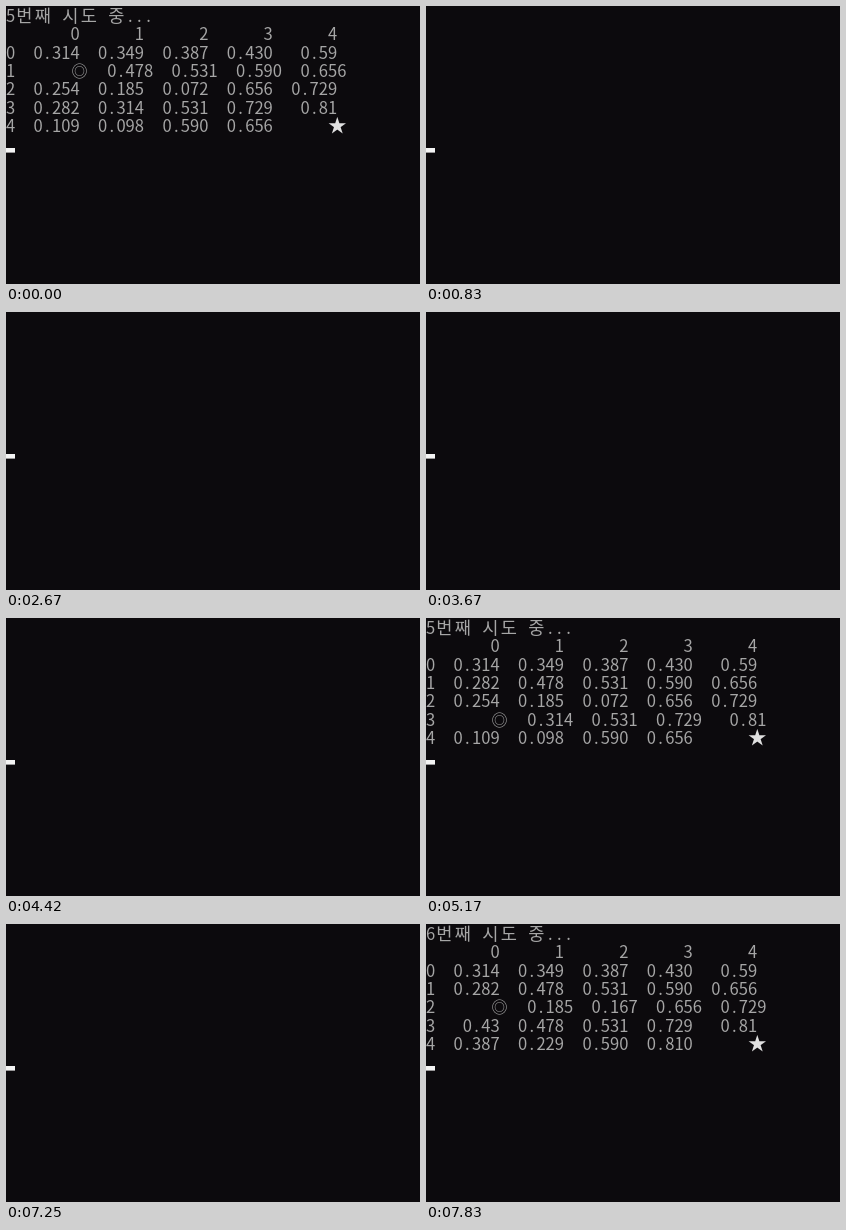
Animation of 414x278 px, one loop 8000 ms. Source, as an HTML page:

```html
<!DOCTYPE html>
<html lang="ko">
<head>
<meta charset="utf-8">
<title>Grid walk</title>
<style>
  html, body { margin: 0; width: 100%; height: 100%; overflow: hidden; background: #0c0a0d; }
  svg { display: block; width: 414px; height: 278px; }
  text {
    font: 400 16.6px "Noto Sans CJK KR", "Noto Sans CJK JP", "Noto Sans CJK SC", "Liberation Sans", sans-serif;
    fill: #a6a6a6;
    text-anchor: middle;
  }
  .hangul { font-size: 17.6px; }
  .mark { font-size: 16px; }
  .star { font-size: 18.6px; fill: #e0e0e0; }
  rect { fill: #f4f4f4; }
</style>
</head>
<body>
<svg id="screen" viewBox="0 0 414 278"></svg>
<script>
const LOOP = 8000, FPS = 12, CELL_W = 9.2, CELL_H = 18.4, BASE = 15.8;
const SIZE = 5, LAST = SIZE - 1, BLANK = 1.5, BOARD_ROWS = 7;
const MARK = '◎', STAR = '★';
const MOVES = { u: [-1, 0], d: [1, 0], l: [0, -1], r: [0, 1], '.': [0, 0] };
const screen = document.getElementById('screen');

// A cell is worth 0.9 to the power of its distance from the star.
const parse = rows => rows.map(row => row.split(' ').map(Number));
const learned = parse(['11 10 9 8 5', '12 7 6 5 4', '13 16 25 4 3', '12 11 6 3 2', '21 22 5 4 0']);
const updated = [
  ...learned.slice(0, 2),
  ...parse(['13 16 17 4 3', '8 7 6 3 2', '9 14 5 2 0'])
];
const worth = k => k ? +(0.9 ** k).toFixed(3) : STAR;

// Columns that hold a symbol drop trailing zeros.
function board(trial, distances, row, col) {
  const arrived = row === LAST && col === LAST;
  const grid = distances.map(line => line.map(worth));
  if (!arrived) grid[row][col] = MARK;
  const mixed = grid[0].map((_, c) => grid.some(line => typeof line[c] === 'string'));
  const show = (v, c) => (mixed[c] ? String(v) : v.toFixed(3)).padStart(7);
  return [
    trial + '번째 시도 중...',
    ' ' + grid[0].map((_, c) => String(c).padStart(7)).join(''),
    ...grid.map((line, r) => r + line.map(show).join('')),
    ...(arrived ? ['', '목적지 도착! steps : 44', 'map에 reward 반영 중...'] : [])
  ];
}

const steps = [];
const add = (slot, lines, cursor = lines.length || BOARD_ROWS) =>
  steps.push({ at: Math.round(Math.floor(slot) * 100 / FPS) * 10, lines, cursor });

// Linear pace between [step, slot] key points.
function pace(keys, n) {
  const i = Math.max(1, keys.findIndex(([step]) => step >= n));
  const [n0, s0] = keys[i - 1], [n1, s1] = keys[i];
  return s0 + (s1 - s0) * (n - n0) / (n1 - n0);
}

// Every move clears the screen, then prints the board again.
function walk(trial, distances, row, col, path, keys) {
  [...path].forEach((move, n) => {
    row += MOVES[move][0];
    col += MOVES[move][1];
    const slot = pace(keys, n);
    add(slot, []);
    add(slot + BLANK, board(trial, distances, row, col));
  });
}

add(0, board(5, learned, 1, 0));
walk(5, learned, 1, 0, 'ddd.rruulddludrrllrlurrdrr',
  [[0, 1], [7, 22], [11, 32], [15, 44], [21, 63], [25, 73]]);
add(83, board(5, learned, LAST, LAST), null);
walk(6, updated, 0, 0, '.dd', [[0, 87], [2, 93]]);

function make(tag, attrs, content = '') {
  const el = document.createElementNS('http://www.w3.org/2000/svg', tag);
  for (const name in attrs) el.setAttribute(name, attrs[name]);
  el.textContent = content;
  screen.append(el);
}

function kind(ch) {
  if (ch === MARK) return 'mark';
  if (ch === STAR) return 'star';
  return /[가-힣]/.test(ch) ? 'hangul' : 'latin';
}

// Prints runs of one kind, every glyph centred in its cell.
function printLine(line, row) {
  let col = 0, run = null;
  const flush = () => {
    if (run) make('text', { class: run.type, x: run.xs.join(' '), y: row * CELL_H + BASE }, run.text);
    run = null;
  };
  for (const ch of line) {
    const type = kind(ch), span = type === 'latin' ? 1 : 2;
    if (ch === ' ' || (run && run.type !== type)) flush();
    if (ch !== ' ') {
      run = run || { type, xs: [], text: '' };
      run.xs.push(((col + span / 2) * CELL_W).toFixed(1));
      run.text += ch;
    }
    col += span;
  }
  flush();
}

function draw({ lines, cursor }) {
  screen.replaceChildren();
  lines.forEach(printLine);
  if (cursor !== null) {
    make('rect', { x: 0, y: (cursor + 1) * CELL_H - 5.2, width: 9, height: 4.6 });
  }
}

let shown = null;
function tick() {
  const t = performance.now() % LOOP;
  const step = steps.findLast(s => s.at <= t);
  if (step !== shown) draw(shown = step);
  requestAnimationFrame(tick);
}
tick();
</script>
</body>
</html>
```
